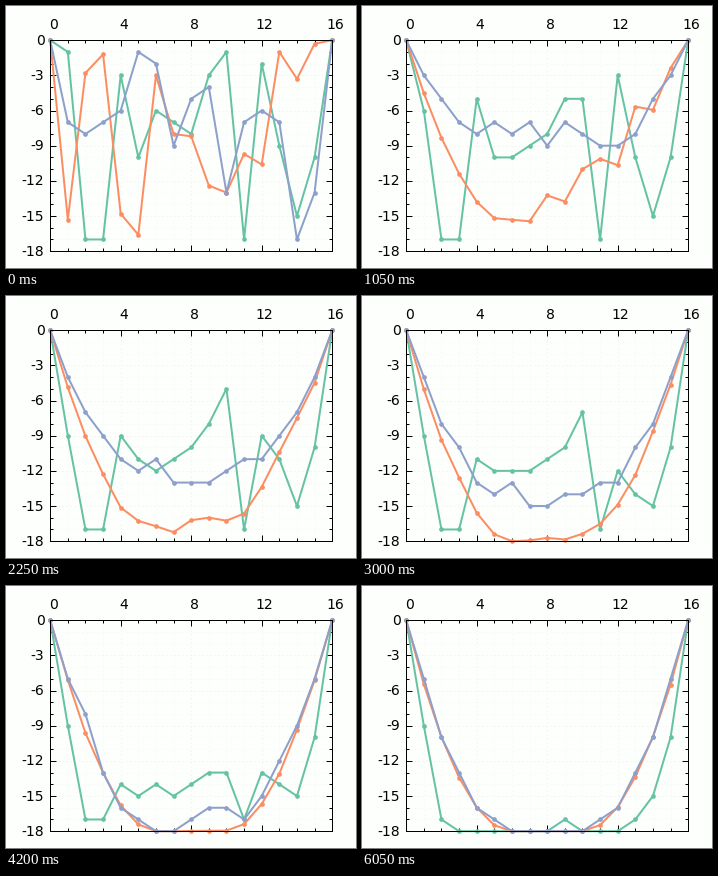
Animation of 350 by 262 pixels, one loop 6100 ms. Source, as a matplotlib script:

```python
import random
import numpy as np
import matplotlib.pyplot as plt
from matplotlib.animation import FuncAnimation
from matplotlib.ticker import MultipleLocator

W, H, DPI = 350, 262, 100
PX = 72 / DPI
FRAMES, STEP_MS = 122, 50
LEFT, TOP, BOX_W, BOX_H = 44.2, 34.2, 282, 211
FLOOR = 18
COLORS = ["#66c2a5", "#fc8d62", "#8da0cb"]

# Depths of the inner sites at the start; both ends stay at zero.
STARTS = [
    [1, 17, 17, 3, 10, 6, 7, 8, 3, 1, 17, 2, 9, 15, 10],
    [15.3, 2.8, 1.2, 14.8, 16.6, 3, 8, 8.2, 12.4, 13, 9.7, 10.6, 1, 3.3, 0.3],
    [7, 8, 7, 6, 1, 2, 9, 5, 4, 13, 7, 6, 7, 17, 13],
]

sites = range(1, 16)
edge = np.minimum(np.minimum(np.arange(17), 16 - np.arange(17)), 6)
rest = edge * (12 - edge) / 2  # parabola resting on the floor


def pad(row):
    return -np.array([0, *row, 0], float)


def topple(start, rng):
    """Each frame one unstable site drops by one unit."""
    u = pad(start)
    poses = [u.copy()]
    while len(poses) < FRAMES:
        pool = [i for i in sites if u[i - 1] + u[i + 1] <= 2 * u[i] and u[i] > -FLOOR]
        if pool:
            u[rng.choice(pool)] -= 1
        poses.append(u.copy())
    return poses


def relax(start, rng, level):
    """Each frame one site, in shuffled rounds, jumps to its current level."""
    u = pad(start)
    poses = [u.copy()]
    order = []
    for t in range(1, FRAMES):
        order = order or rng.sample(sites, len(sites))
        i = order.pop()
        u[i] = -level(i, t + 6)
        poses.append(u.copy())
    return poses


def fade(amount, end, t):
    return amount * max(0, 1 - t / end)


def sag(i, t, side, middle):
    """Depth of a site whose sides and middle settle at different rates."""
    w = (rest[i] / FLOOR) ** 2
    return rest[i] * (1 - (1 - w) * fade(*side, t) - w * fade(*middle, t))


def smooth(i, t):
    lag = 0.055 * max(0, i - 7) * np.exp((21 - t) / 16)
    return sag(i, t, (0.19, 125), (0.22, 62)) - rest[i] * min(0.4, lag)


def rounded(i, t):
    return round(sag(i, t, (0.43, 130), (0.71, 85)))


rng = random.Random(4)
curves = [topple(STARTS[0], rng), relax(STARTS[1], rng, smooth), relax(STARTS[2], rng, rounded)]

fig = plt.figure(figsize=(W / DPI, H / DPI), dpi=DPI, facecolor="#fdfffc")
ax = fig.add_axes([LEFT / W, 1 - (TOP + BOX_H) / H, BOX_W / W, BOX_H / H], facecolor="none")
ax.set(xlim=(0, 16), ylim=(-FLOOR, 0))
for axis, step in ((ax.xaxis, 4), (ax.yaxis, 3)):
    axis.set_major_locator(MultipleLocator(step))
    axis.set_minor_locator(MultipleLocator(1))
for which, size in (("major", 6), ("minor", 3)):
    ax.tick_params(which=which, direction="in", length=size * PX, width=PX,
                   top=True, right=True, labelbottom=False, labelleft=False)
ax.grid(which="major", color="#eeeeee", lw=PX, ls=(0, (1, 3)))
ax.grid(which="minor", color="#f6f6f6", lw=PX, ls=(0, (1, 3)))
ax.set_axisbelow(True)
for spine in ax.spines.values():
    spine.set(linewidth=PX, zorder=10)

font = dict(family="DejaVu Sans", size=14 * PX, va="baseline")
for x in range(0, 17, 4):
    fig.text((47.2 + x * BOX_W / 16) / W, 1 - 23 / H, str(x), ha="center", **font)
for y in range(0, FLOOR + 1, 3):
    fig.text(38.5 / W, 1 - (TOP + 4.6 + y * BOX_H / FLOOR) / H, f"-{y}" if y else "0",
             ha="right", **font)

lines = [ax.plot(range(17), c[0], color=color, lw=2 * PX, marker="o", ms=4.7 * PX,
                 mew=0, clip_on=False, zorder=3 + k)[0]
         for k, (c, color) in enumerate(zip(curves, COLORS))]


def draw(n):
    for line, c in zip(lines, curves):
        line.set_ydata(c[n])
    return lines


anim = FuncAnimation(fig, draw, frames=FRAMES, interval=STEP_MS, repeat=True, repeat_delay=0)
plt.show()
```
